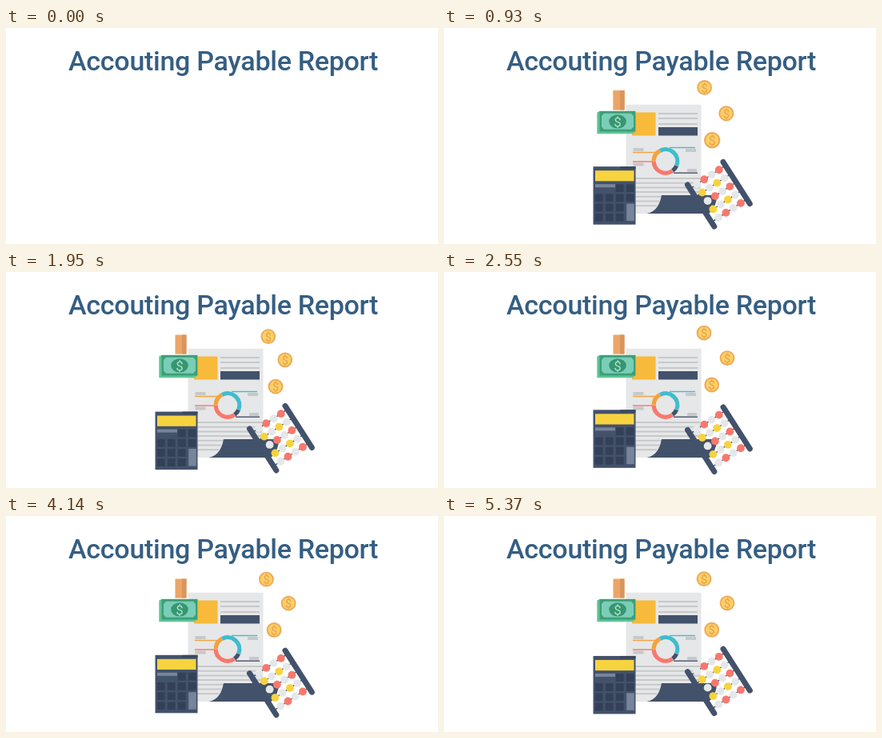
Write an HTML page that moves like this. It is 540 px wide and 270 px high and loops after 5.4 s.

```html
<!DOCTYPE html>
<html lang="en">
<head>
<meta charset="utf-8">
<title>Accouting Payable Report</title>
<style>
  html, body { margin: 0; width: 100%; height: 100%; overflow: hidden; background: #fff; }
  svg { display: block; width: 540px; height: 270px; }
  .title { font: 500 34px Roboto, "Open Sans", sans-serif; letter-spacing: -0.3px; fill: #355e83; }
  .sign { font-family: Roboto, "Open Sans", sans-serif; text-anchor: middle; }
</style>
</head>
<body>
<svg id="stage" viewBox="0 0 540 270">
  <text class="title" x="78" y="53">Accouting Payable Report</text>
</svg>
<script>
const NS = 'http://www.w3.org/2000/svg';
const LOOP = 5400, STEP = 30;
const NAVY = '#43526b', DARK = '#334057', GREY = '#c6c8ca', PAPER = '#e6e7e8';
const YELLOW = '#f7d33f', GOLD = '#f7ba3a', ORANGE = '#f2a23c', RED = '#f8786d', TEAL = '#40bccd';
const stage = document.getElementById('stage');

function add(parent, tag, attrs = {}, text) {
  const el = document.createElementNS(NS, tag);
  for (const k in attrs) el.setAttribute(k, attrs[k]);
  if (text) el.textContent = text;
  parent.appendChild(el);
  return el;
}
const group = parent => add(parent, 'g');
const rect = (p, x, y, width, height, fill) => add(p, 'rect', { x, y, width, height, fill });
const circle = (p, cx, cy, r, fill) => add(p, 'circle', { cx, cy, r, fill });
const line = (p, x1, y1, x2, y2, stroke, w) =>
  add(p, 'line', { x1, y1, x2, y2, stroke, 'stroke-width': w });
const place = (el, value) => el.setAttribute('transform', value);
const show = (el, on) => el.setAttribute('visibility', on ? 'visible' : 'hidden');

// Timing helpers
const part = (t, from, to) => Math.min(1, Math.max(0, (t - from) / (to - from)));
const easeOut = k => 1 - (1 - k) ** 3;
const back = k => k <= 0 ? 0 : 1 + 2.7 * (k - 1) ** 3 + 1.7 * (k - 1) ** 2;
const wave = (t, peak, period) => Math.cos(2 * Math.PI * (t - peak) / period);
const mix = (a, b, k) => a + (b - a) * k;
const zoom = (x, y, s) => `translate(${x} ${y}) scale(${s}) translate(${-x} ${-y})`;

// Sheet with its rolled end
const paper = group(stage);
const sheet = add(paper, 'path', { fill: PAPER });
const textLines = [];
for (let i = 0; i < 7; i++) {
  const y = 188 + 5.7 * i, end = i < 4 ? 320 : 284 - 3 * i;
  textLines.push({ end, el: line(paper, 239, y, end, y, GREY, 2) });
}
const block = rect(paper, 235, 105.5, 29.5, 29, GOLD);
const roll = add(stage, 'path', { fill: NAVY });

// Parts that slide in sideways
const sliders = [];
const slide = (el, offset, from, to) => sliders.push({ el, offset, from, to });
slide(line(stage, 268, 107, 317, 107, GREY, 2), 100, 240, 480);
slide(line(stage, 268, 113, 317, 113, GREY, 2), 100, 345, 705);
slide(line(stage, 268, 120, 317, 120, GREY, 2), 100, 240, 500);
slide(rect(stage, 268, 124, 49, 10.5, NAVY), 100, 210, 450);
slide(line(stage, 282, 149.5, 314, 149.5, TEAL, 1.4), 25, 540, 720);
slide(line(stage, 236, 155.5, 264, 155.5, ORANGE, 1.4), -35, 390, 630);
slide(line(stage, 236, 167, 261, 167, RED, 1.4), -35, 540, 760);
slide(line(stage, 287, 181.2, 317, 181.2, NAVY, 1.4), 30, 330, 500);
slide(rect(stage, 236.5, 150, 13, 4, GREY), -20, 390, 600);
slide(rect(stage, 302, 151, 13, 4, GREY), 20, 570, 780);
slide(rect(stage, 236.5, 168.5, 13, 4, GREY), -20, 570, 780);
slide(rect(stage, 304, 176, 12, 4, GREY), 20, 570, 780);

const donut = group(stage);
function arc(from, to, color) {
  const r = 14.8;
  const at = deg => {
    const a = deg * Math.PI / 180;
    return `${277 + r * Math.sin(a)} ${166.5 - r * Math.cos(a)}`;
  };
  add(donut, 'path', {
    d: `M${at(from)}A${r} ${r} 0 0 1 ${at(to)}`,
    fill: 'none', stroke: color, 'stroke-width': 5.2
  });
}
arc(-28, 112, TEAL);
arc(113, 144, NAVY);
arc(145, 268, RED);
arc(269, 331, ORANGE);

// Abacus
const abacus = group(stage);
for (let row = 0; row < 5; row++) {
  const x = 316 + 6.8 * row, y = 193.7 + 10.4 * row;
  line(abacus, x - 9, y + 6, x + 36, y - 23.5, NAVY, 1.4);
}
for (let row = 0; row < 5; row++) {
  for (let col = 0; col < 4; col++) {
    const tint = row % 2 ? YELLOW : RED;
    // Yellow rows start with a coloured bead, red rows with a pale one
    const fill = (row + col) % 2 ? tint : PAPER;
    circle(abacus, 316 + 6.8 * row + 9.25 * col, 193.7 + 10.4 * row - 6 * col, 4.9, fill);
  }
}
for (const [x1, y1, x2, y2] of [[304.5, 194.5, 337.8, 246.5], [349, 166, 382.3, 218]])
  line(abacus, x1, y1, x2, y2, NAVY, 7).setAttribute('stroke-linecap', 'round');

// Calculator, drawn from its top left corner
const calc = group(stage);
rect(calc, 0, 0, 53, 72.5, NAVY);
rect(calc, 34, 0, 19, 3.2, '#394860');
rect(calc, 2.5, 5, 48.5, 13.2, YELLOW);
rect(calc, 2.5, 22, 25, 4, '#77849a');
for (let row = 0; row < 4; row++) {
  for (let col = row ? 0 : 2; col < (row > 1 ? 3 : 4); col++)
    rect(calc, 2.3 + 13 * col, 22 + 12.2 * row, 9.8, 9.8, DARK);
}
rect(calc, 41.7, 46.4, 9.6, 21.5, '#77849a');

// Coin stack and bank note
const stack = group(stage);
rect(stack, 211.5, 78.5, 14, 24, '#eda768');
rect(stack, 220, 78.5, 5.5, 24, '#d9945c');
for (let y = 82; y < 102; y += 3.3) line(stack, 211.5, y, 225.5, y, '#dd9c62', 0.4);

const note = group(stage);
add(note, 'path', { d: 'M191.3 105.5L195 103.7H239.3V129L236 132.3H191.3Z', fill: '#5fc596' });
rect(note, 194.5, 104, 44.8, 25.5, '#3f9e78');
add(note, 'path', {
  d: 'M200 106.7H234L237 110V123.5L234 126.8H200L197 123.5V110Z', fill: '#7acdb6'
});
add(note, 'ellipse', { cx: 217, cy: 116.8, rx: 10.8, ry: 8.6, fill: '#389570' });
add(note, 'text', { class: 'sign', x: 217, y: 122.8, 'font-size': 17, fill: '#a5e5cb' }, '$');

// Floating coins: centre, sideways swing, rise, start
const coins = [
  [325, 77.5, 3, 3.1, 630],
  [354, 108.3, -5.5, 1.5, 720],
  [334.7, 141.7, 2.4, 1.5, 810]
].map(([x, y, swing, rise, start]) => {
  const el = group(stage);
  circle(el, 0, 0, 9.4, '#eda95a');
  circle(el, 0, 0, 7.5, '#fbcf65');
  add(el, 'text', { class: 'sign', x: 0, y: 5.1, 'font-size': 14.5, fill: '#e89f4e' }, '$');
  return { el, x, y, swing, rise, start };
});

function drawPaper(t) {
  place(paper, `translate(0 96) scale(1 ${back(part(t, 30, 360))}) translate(0 -96)`);
  const k = easeOut(part(t, 510, 800));
  const low = mix(215, 232, k);
  const top = mix(202, 209, k);
  sheet.setAttribute('d', `M227.5 95.7H321.5V${top}H272Q268 ${low} 253 ${low}H243` +
    `Q227.5 ${low} 227.5 ${mix(215, 214, k)}Z`);
  roll.setAttribute('d', `M272 ${top}H341Q341 224 331 232H253Q268 230 272 ${top}Z`);
  show(roll, t >= 300);
  place(block, zoom(250, 120, easeOut(part(t, 180, 700))));
  textLines.forEach(({ end, el }, i) => {
    const p = easeOut(part(t, 600 + i * 30, 780 + i * 30));
    el.setAttribute('x2', mix(239, end, p));
    show(el, p > 0);
  });
}

function draw(t) {
  drawPaper(t);
  for (const { el, offset, from, to } of sliders) {
    place(el, `translate(${offset * (1 - easeOut(part(t, from, to)))} 0)`);
    show(el, t > from);
  }
  place(donut, zoom(277, 166.5, easeOut(part(t, 240, 740))));

  const slip = 31 * (1 - easeOut(part(t, 150, 780)));
  const sway = 1.5 + 1.5 * wave(t, 2465, 2030);
  place(abacus, `translate(${slip} ${sway}) ` + zoom(343, 207, easeOut(part(t, 150, 420))));

  const size = t < 510 ? 1.32 * easeOut(part(t, 240, 510)) : mix(1.32, 1, part(t, 510, 860));
  const top = 173.9 - 1.6 * wave(t, 2600, 2030);
  place(calc, `translate(213 ${top + 36.25}) scale(${size}) translate(-26.5 -36.25)`);

  place(note, zoom(215, 118, back(part(t, 600, 870))));
  place(stack, zoom(218.5, 102.5, back(part(t, 720, 960))));

  const rise = wave(t, 2880, 1900);
  const swing = (1 - wave(t, 2550, 1410)) / 2;
  for (const c of coins) {
    const s = back(part(t, c.start, c.start + 240));
    place(c.el, `translate(${c.x + c.swing * swing} ${c.y - c.rise * rise}) scale(${s})`);
  }
}

const begin = performance.now();
function tick() {
  const t = (performance.now() - begin) % LOOP;
  draw(t < 60 ? 0 : Math.floor(t / STEP) * STEP);
  requestAnimationFrame(tick);
}
tick();
</script>
</body>
</html>
```
